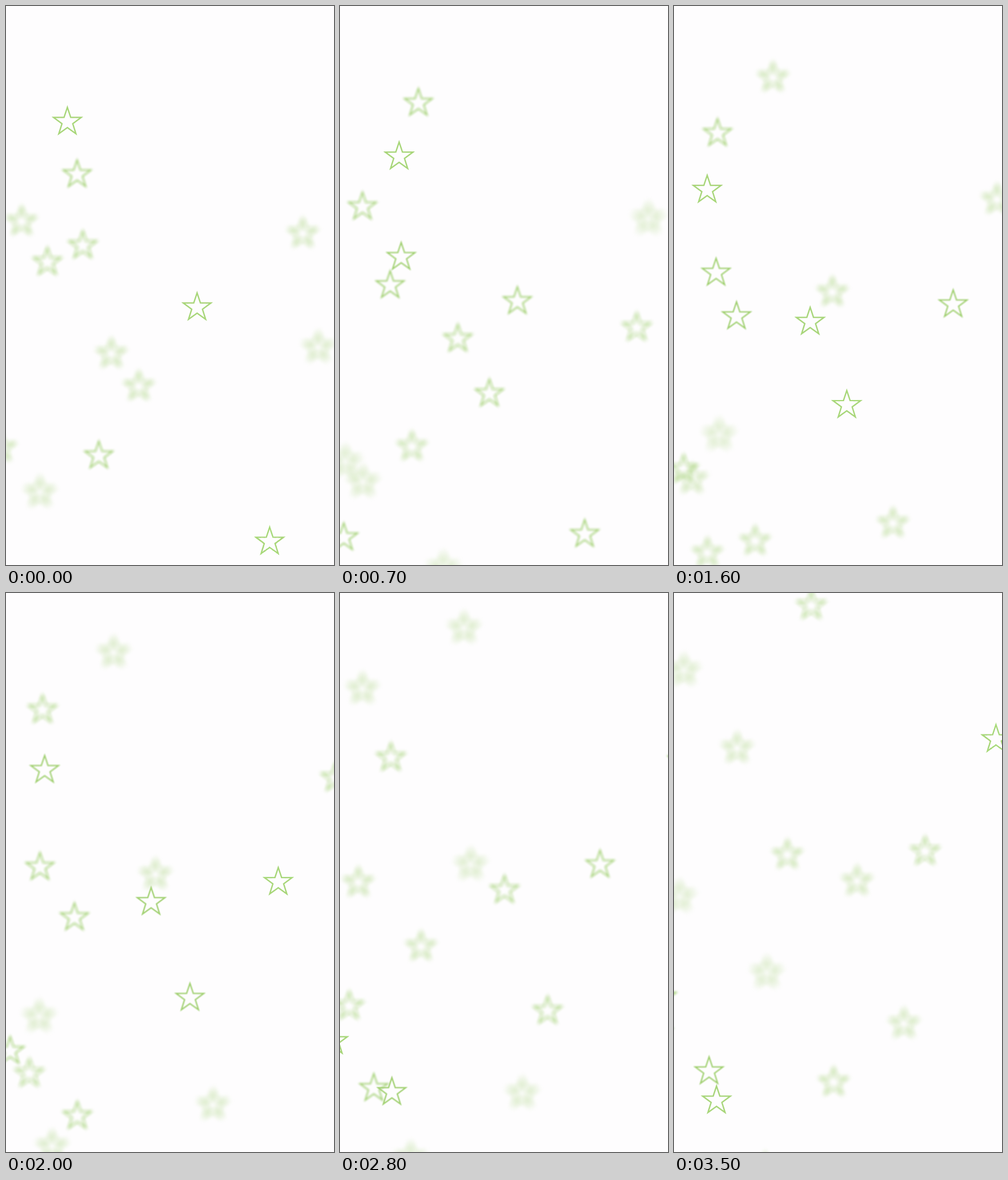
These frames come from a looping animation (574x976 px, 3.6 s). An HTML page with a canvas:

```html
<!DOCTYPE html>
<html lang="en">
<head>
<meta charset="utf-8">
<title>Drifting stars</title>
<style>
  html, body { margin: 0; width: 100%; height: 100%; overflow: hidden; background: #fefdfe; }
  canvas { display: block; }
</style>
</head>
<body>
<canvas id="stage" width="574" height="976"></canvas>
<script>
const LOOP = 3600, STEP = 100, END = 3500;
const DEFOCUS = 3 / 1000, MAX_BLUR = 7.5, COPIES = 24, BOX = 104;

// Each star: where it starts, how far it drifts, and when it is in focus
const stars = [
  [108, 202, 133, -180, -50],
  [125, 294, -107, -159, 750],
  [28, 376, 83, -105, 1550],
  [135, 418, -125, 112, 1150],
  [73, 447, 90, 216, 1200],
  [520, 397, 98, -132, 3300],
  [335, 526, -136, -69, 50],
  [547, 596, -107, -145, 2050],
  [185, 607, 136, -104, 1720],
  [233, 664, 170, 88, 1620],
  [-8, 771, 83, 115, 3400],
  [163, 785, -183, -80, -800],
  [60, 849, -86, -81, 2900],
  [462, 935, -182, -81, 0],
  [-35, 905, 195, 98, 0],
  [212, 1019, -150, -184, 3100],
  [750, 450, -186, -195, 3500]
];

const ctx = document.getElementById("stage").getContext("2d");
const sprite = document.createElement("canvas");
sprite.width = sprite.height = BOX;
const pen = sprite.getContext("2d");

const shape = new Path2D();
for (let i = 0; i < 10; i++) {
  const r = i % 2 ? 9.9 : 25.5, a = i * Math.PI / 5;
  shape.lineTo(r * Math.sin(a), -r * Math.cos(a));
}
shape.closePath();

// Straight drift plus a diagonal sway that depends on when the star is in focus
function place([x, y, dx, dy, focus], t) {
  const u = t / END;
  const sway = (7 * Math.cos(focus * Math.PI / 2000) - 2) * 4 * u * (1 - u);
  return [x + dx * u + sway - 0.6, y + dy * u + sway + 0.4];
}

// Blur rises and falls as a triangle wave
function blurAt(focus, t) {
  const b = Math.abs(t - focus) * DEFOCUS % (2 * MAX_BLUR);
  return Math.min(b, 2 * MAX_BLUR - b);
}

// Lens blur: faint copies spread evenly over a disc, then softened
function drawStar(x, y, blur) {
  const left = Math.floor(x), top = Math.floor(y);
  pen.globalCompositeOperation = "lighter";
  pen.globalAlpha = 1 / COPIES;
  pen.strokeStyle = "#a6cf82";
  pen.lineWidth = 2.3;
  pen.clearRect(0, 0, BOX, BOX);
  for (let i = 0; i < COPIES; i++) {
    const r = 1.45 * blur * Math.sqrt((i + 0.5) / COPIES), a = i * 2.39996;
    pen.save();
    pen.translate(BOX / 2 + x - left + r * Math.cos(a), BOX / 2 + y - top + r * Math.sin(a));
    pen.stroke(shape);
    pen.restore();
  }
  ctx.filter = `blur(${(0.3 + 0.35 * blur).toFixed(2)}px)`;
  ctx.drawImage(sprite, left - BOX / 2, top - BOX / 2);
  ctx.filter = "none";
}

function draw(t) {
  ctx.fillStyle = "#fefdfe";
  ctx.fillRect(0, 0, 574, 976);
  for (const star of stars) drawStar(...place(star, t), blurAt(star[4], t));
}

const start = performance.now();
let shown = -1;
function tick() {
  const t = (performance.now() - start) % LOOP;
  const now = Math.floor(t / STEP) * STEP;
  if (now !== shown) draw(shown = now);
  requestAnimationFrame(tick);
}
tick();
</script>
</body>
</html>
```
